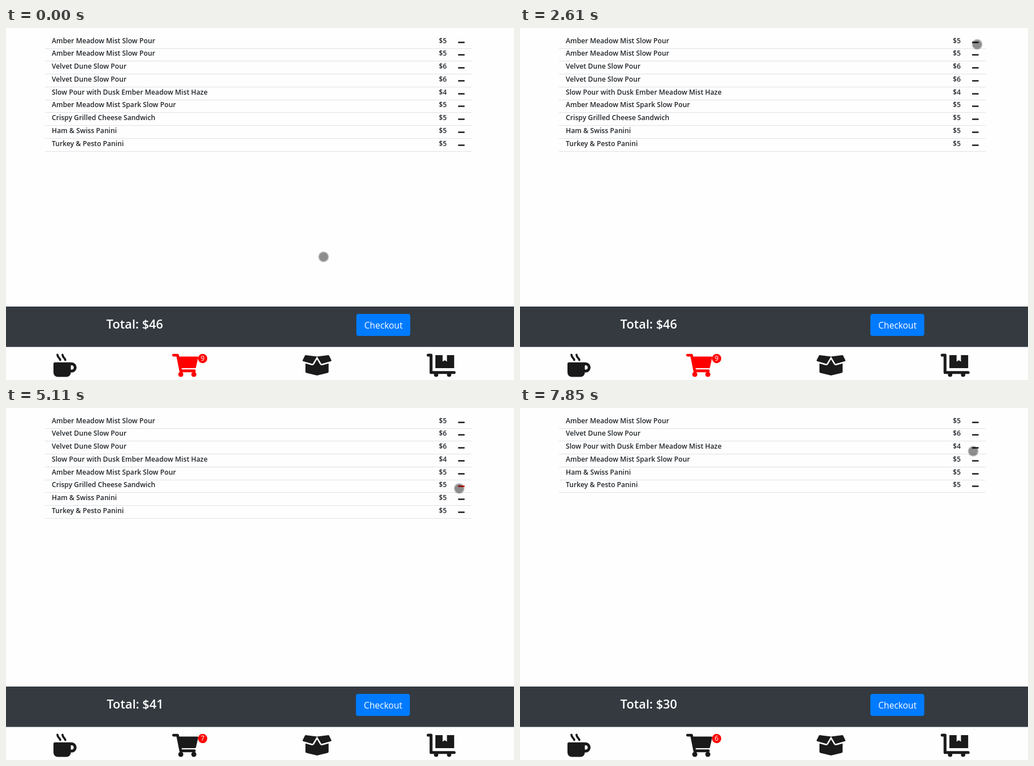
An HTML page that plays this animation: 899 px wide and 623 px high, repeating every 8 s.

```html
<!DOCTYPE html>
<html lang="en">
<head>
<meta charset="utf-8">
<title>Cart</title>
<style>
html, body { margin: 0; height: 100%; overflow: hidden; background: #fefefe; }
svg { display: block; width: 899px; height: 623px; font-family: "Open Sans", "Noto Sans", sans-serif; }
#rows { font-size: 12.2px; font-weight: 600; fill: #212529; }
.icon { color: #1a1a1a; fill: currentColor; stroke-linejoin: round; stroke-linecap: round; }
.line { fill: none; stroke: currentColor; }
</style>
</head>
<body>
<svg viewBox="0 0 899 623">
  <g id="rows"></g>
  <rect y="493" width="899" height="71.5" fill="#343a40"/>
  <text id="total" y="532" font-size="21.8" font-weight="600" fill="#fff"></text>
  <g id="button">
    <rect x="620" y="506" width="95.4" height="39" rx="4" fill="#007bff"/>
    <text x="634" y="532" font-size="15.6" fill="#fff">Checkout</text>
  </g>
  <g class="icon" transform="translate(84 576.5) scale(.08)">
    <path id="steam" class="line" stroke-width="46" d="M88 22Q92 62 118 88T150 138"/>
    <use href="#steam" x="112"/>
    <path d="M0 224a32 32 0 0 1 32-32H384V416a96 96 0 0 1-96 96H96a96 96 0 0 1-96-96z"/>
    <circle class="line" cx="400" cy="304" r="80" stroke-width="64"/>
  </g>
  <g class="icon" id="cart" transform="translate(294 576.5) scale(.08)">
    <path class="line" stroke-width="60" d="M30 32H120L190 378H492"/>
    <path stroke="currentColor" stroke-width="40" d="M140 84H556L507 300H180z"/>
    <circle cx="192" cy="456" r="56"/><circle cx="480" cy="456" r="56"/>
  </g>
  <circle cx="348" cy="585" r="8.2" fill="red"/>
  <text id="count" x="348" y="589.4" font-size="12" fill="#fff" text-anchor="middle"></text>
  <g class="icon" transform="translate(524.8 576.5) scale(.08)">
    <path d="M64 215L196 254Q236 263 256 232L320 126 384 232Q404 263 444 254L576 215V400Q576 418 552 424L320 481 88 424Q64 418 64 400z"/>
    <path id="flap" d="M53 41Q58 31 70 32L320 64 228 216Q222 226 210 223L12 167Q-4 160 2 144z"/>
    <use href="#flap" transform="matrix(-1 0 0 1 640 0)"/>
  </g>
  <g class="icon" transform="translate(744.5 576.5) scale(.08)">
    <path class="line" stroke-width="64" d="M32 32H96V416H608"/>
    <path d="M192 32H352V176l48-32 48 32V32H608V320H192z"/>
    <circle cx="208" cy="464" r="48"/><circle cx="496" cy="464" r="48"/>
  </g>
  <g id="pointer"><circle r="9.4" fill-opacity=".25"/><circle r="7.8" fill-opacity=".26"/></g>
</svg>
<script>
const LOOP = 8000, PITCH = 22.75;
const REST = 150, LIFT = 370; // least time on a stop, longest time in the air
const $ = id => document.getElementById(id);

const item = (name, price, tap = Infinity, gone = Infinity) => ({ name, price, tap, gone });
const items = [
  item("Amber Meadow Mist Slow Pour", 5, 3390, 3810),
  item("Amber Meadow Mist Slow Pour", 5),
  item("Velvet Dune Slow Pour", 6),
  item("Velvet Dune Slow Pour", 6, 6980, 7230),
  item("Slow Pour with Dusk Ember Meadow Mist Haze", 4),
  item("Amber Meadow Mist Spark Slow Pour", 5),
  item("Crispy Grilled Cheese Sandwich", 5, 5110, 5740),
  item("Ham &amp; Swiss Panini", 5),
  item("Turkey &amp; Pesto Panini", 5)
];

// the pointer crosses the page, then works down the column of minus signs
const stop = (time, y, x = 802) => ({ time, x, y });
const stops = [
  stop(0, 405, 562), stop(1120, 405, 562), stop(1410, 478.5, 492.5), stop(1840, 346.5, 578),
  stop(2250, 60.5, 766.5), stop(2610, 29, 809), stop(3660, 31.5), stop(4060, 50.5),
  stop(4580, 142.5), stop(6350, 75.5), stop(6600, 67.5), stop(7350, 70.5), stop(7850, 76.5)
];

$("rows").innerHTML = items.map(({ name, price }) => `<g>
  <text x="81" y="26.6">${name}</text><text x="766" y="26.6">$${price}</text>
  <rect class="minus" x="800" y="24.2" width="11.7" height="2.6" rx=".8"/>
  <path d="M69 36.5H824" stroke="#dee2e6"/></g>`).join("");
const rows = [...$("rows").children];

// Far hops lift the pointer off the page; long ones touch down half-way.
function pointerAt(t) {
  const i = stops.findLastIndex(s => s.time <= t), from = stops[i], to = stops[i + 1];
  if (!to || Math.hypot(to.x - from.x, to.y - from.y) < 40) return from;
  const leave = Math.max(from.time + REST, to.time - LIFT), air = to.time - leave;
  if (t < leave) return from;
  const midway = Math.floor((t - leave) / air * 3) === 1;
  return air > 300 && midway ? { x: (from.x + to.x) / 2, y: (from.y + to.y) / 2 } : null;
}

function draw(t) {
  let line = 0, total = 0;
  items.forEach(({ price, tap, gone }, i) => {
    const row = rows[i], shown = t < gone;
    row.style.display = shown ? "" : "none";
    if (!shown) return;
    row.setAttribute("transform", `translate(0 ${Math.floor(PITCH * line++)})`);
    row.querySelector(".minus").style.fill = t >= tap ? "red" : "#1a1a1a";
    total += price;
  });
  const shift = total % 10 === 1 ? .7 : 0; // a narrow 1 shares its space out
  $("total").textContent = `Total: $${total}`;
  $("total").setAttribute("x", 177.6 + shift);
  $("button").setAttribute("transform", `translate(${-shift} 0)`);
  $("count").textContent = items.filter(({ tap }) => t < tap).length;
  $("cart").style.color = t < items[0].tap ? "red" : "";

  const spot = pointerAt(t);
  $("pointer").style.display = spot ? "" : "none";
  if (spot) $("pointer").setAttribute("transform", `translate(${spot.x} ${spot.y})`);
}

function frame() {
  draw(performance.now() % LOOP);
  requestAnimationFrame(frame);
}
frame();
</script>
</body>
</html>
```
